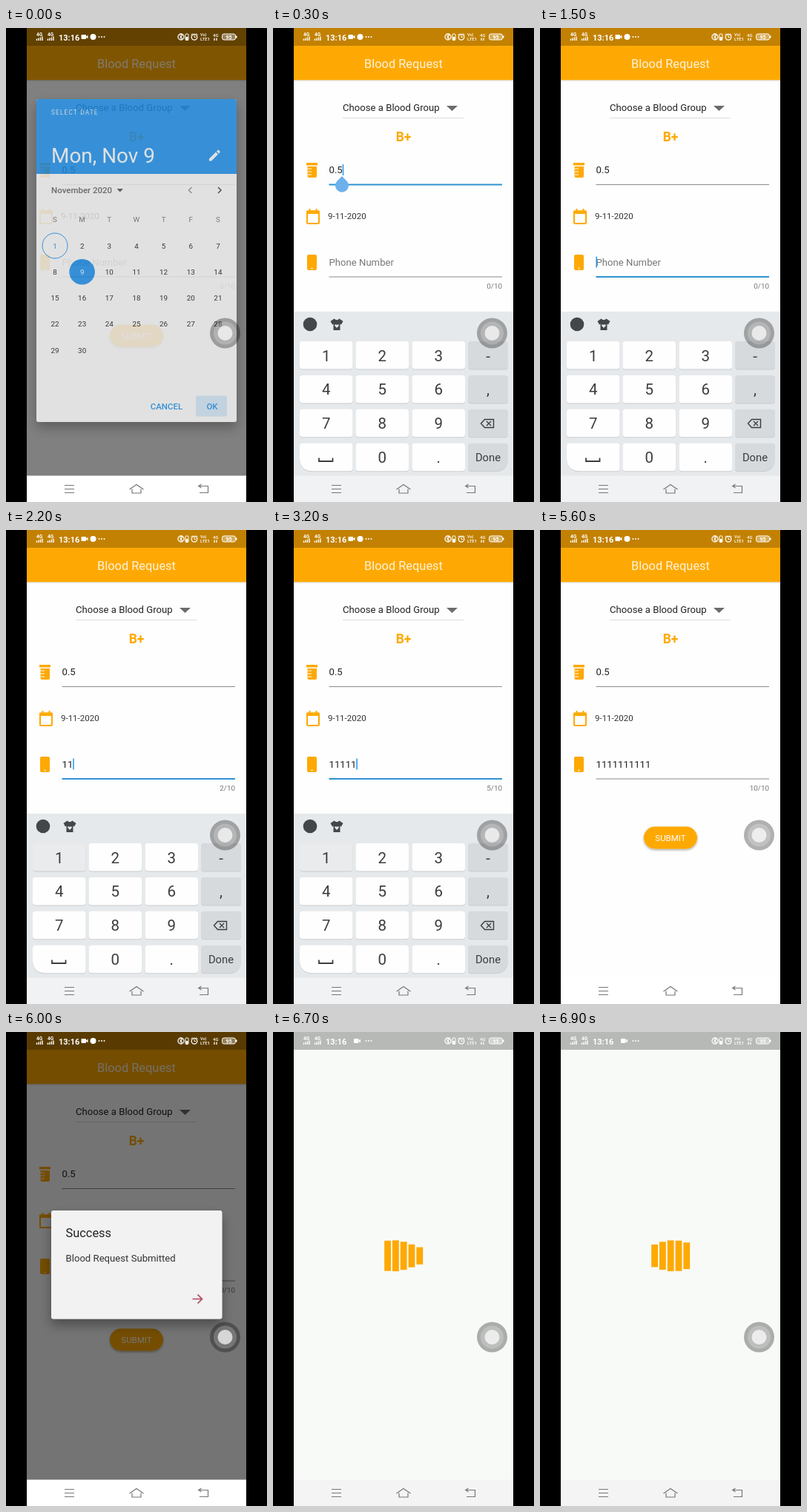
These frames come from a looping animation (352x640 px, 7 s). An HTML page:

```html
<!DOCTYPE html>
<html lang="en">
<head>
<meta charset="utf-8">
<title>Blood Request</title>
<style>
html, body { margin: 0; width: 100%; height: 100%; overflow: hidden; background: #000; }
svg { display: block; width: 352px; height: 640px; font-family: Roboto, sans-serif; }
text { white-space: pre; }
</style>
</head>
<body>
<svg id="stage" viewBox="0 0 352 640"></svg>
<script>
const LOOP = 7000, ORANGE = '#fea903', BLUE = '#2196f3';

// Markup helpers
const rect = (x, y, w, h, fill, more = '') =>
  `<rect x="${x}" y="${y}" width="${w}" height="${h}" fill="${fill}" ${more}/>`;
const circle = (x, y, r, fill, more = '') =>
  `<circle cx="${x}" cy="${y}" r="${r}" fill="${fill}" ${more}/>`;
const text = (x, y, size, fill, str, more = '') =>
  `<text x="${x}" y="${y}" font-size="${size}" fill="${fill}" ${more}>${str}</text>`;
const fillPath = (d, fill, more = '') => `<path d="${d}" fill="${fill}" ${more}/>`;
const line = (d, stroke, width = 1, more = '') =>
  `<path d="${d}" fill="none" stroke="${stroke}" stroke-width="${width}" ${more}/>`;
const group = (id, body, more = '') => `<g id="${id}" ${more}>${body}</g>`;
const MID = 'text-anchor="middle"', END = 'text-anchor="end"', MEDIUM = 'font-weight="500"';

function form() {
  const beaker = rect(45, 182, 15, 3.5, ORANGE) +
    fillPath('M46.5 187H59V200Q59 202 57 202H48.5Q46.5 202 46.5 200Z', ORANGE) +
    line('M46.5 190H52M46.5 194H52M46.5 198H52', '#fdfefd', 1.2);
  const calendar = rect(46, 247.5, 16, 16.5, 'none', `rx="1.5" stroke="${ORANGE}" stroke-width="2"`) +
    rect(45, 246.5, 18, 4.5, ORANGE, 'rx="1"') + line('M49.5 244V248M58.5 244V248', ORANGE, 2);
  const phone = rect(46, 306, 13, 21, ORANGE, 'rx="2"') + circle(52.5, 324.5, 1, '#fff');
  return rect(28, 0, 296, 640, '#fdfefd') +
    rect(28, 24, 296, 46.5, ORANGE) + rect(28, 70.5, 296, 1, '#d9d9d9') +
    rect(28, 0, 296, 24, '#c28102') +
    text(176, 53.5, 16.4, '#fff3da', 'Blood Request', MID) +
    text(94, 112, 13.15, '#222', 'Choose a Blood Group') +
    fillPath('M234 105H249L241.500 112Z', '#6b6b6b') +
    line('M94 121.500H257', '#dcdcdc') +
    text(176, 152.500, 17.500, ORANGE, 'B+', MID + ' font-weight="700"') +
    beaker + calendar + phone +
    text(75.500, 196, 13.15, '#222', '0.5') +
    line('M75.500 211.500H309', '#8b8b8b', 1, 'id="line1"') +
    group('handle', line('M94.500 184V199', BLUE, 1.500, 'id="caret1"') +
      fillPath('M93 200L99.400 206.400A9 9 0 1 1 86.600 206.400Z', '#6cb1ec')) +
    text(74, 258, 11.5, '#333', '9-11-2020') +
    text(75.5, 320.5, 13.15, '#777', 'Phone Number', 'id="hint"') +
    text(75.5, 320.5, 13.15, '#222', '', 'id="typed"') +
    line('M0 308.500V323.500', BLUE, 1.5, 'id="caret2"') +
    line('M75.500 336H309', '#8b8b8b', 1, 'id="line2"') +
    text(309, 352, 9.86, '#777', '0/10', 'id="count" ' + END) +
    rect(140, 400.5, 72, 30, ORANGE, 'rx="15" filter="url(#soft)"') +
    text(176, 419.5, 11.5, '#fff', 'SUBMIT', MID);
}

function keyboard() {
  const cols = [[36, 71.5], [111.5, 71.5], [187.5, 71.5], [263, 54]];
  const labels = ['1', '2', '3', '-', '4', '5', '6', ',', '7', '8', '9', '', '', '0', '.', 'Done'];
  let out = rect(28, 383, 296, 222, '#e6e9eb') + circle(50, 400, 9.3, '#43474a') +
    fillPath('M82.500 392.500Q86 396 89.500 392.500L94.500 396L92 400.500L90.500 399.500V408H81.500V399.500L80 400.500L77.500 396Z', '#43474a') +
    fillPath('M86 405L83 401.700Q83.300 399.200 86 400.700Q88.700 399.200 89 401.700Z', '#e6e9eb');
  labels.forEach((label, i) => {
    const col = i % 4, [x, w] = cols[col], y = 423 + 45.9 * (i >> 2), h = 37.5;
    const bl = i == 12 ? 18 : 4, br = i == 15 ? 18 : 4;
    const d = `M${x + 4} ${y}h${w - 8}q4 0 4 4v${h - 4 - br}q0 ${br} ${-br} ${br}h${bl + br - w}` +
      `q${-bl} 0 ${-bl} ${-bl}v${bl + 4 - h}q0 -4 4 -4z`;
    out += fillPath(d, '#c9ccd0', 'transform="translate(0 1)"') +
      fillPath(d, col == 3 ? '#d7dadd' : '#fefefe', `id="key${i}"`) +
      text(x + w / 2, y + (label == 'Done' ? 24.5 : 26.5), label == 'Done' ? 14.8 : 20.5, '#3a3d40', label, MID);
  });
  return out + line('M62 580.500V585H80.500V580.500', '#3a3d40', 1.8) +
    line('M280.500 534L285.500 528.500H297.500V539.500H285.500ZM288 531L294 537M294 531L288 537', '#3a3d40', 1.4);
}

function datePicker() {
  const colX = i => 66 + 36.65 * i;
  let out = rect(41, 96, 270, 436, '#fff', 'rx="3" filter="url(#drop)"') +
    fillPath('M41 197V99Q41 96 44 96H308Q311 96 311 99V197Z', BLUE) +
    text(61, 117, 8.2, '#e4f1fd', 'SELECT DATE', 'letter-spacing="1.23"') +
    text(61, 182, 27.95, '#fff', 'Mon, Nov 9') +
    fillPath('M274 179.500V176.500L283 167.500L286 170.500L277 179.500ZM284 166.500L285.500 165Q286.200 164.500 287 165L288.500 166.500Q289 167.200 288.500 168L287 169.500Z', '#fff') +
    text(61, 223, 11.5, '#666', 'November 2020', MEDIUM) +
    fillPath('M149.500 217H158L153.750 221.500Z', '#555') +
    line('M250.500 215L246.500 219L250.500 223', '#999', 1.5) +
    line('M286 215L290 219L286 223', '#444', 1.5) +
    circle(66, 294, 17, 'none', `stroke="${BLUE}"`) + circle(102.6, 329.3, 17.3, BLUE);
  [...'SMTWTFS'].forEach((c, i) => out += text(colX(i), 261.5, 9.86, '#777', c, MID));
  for (let d = 1; d <= 30; d++) {
    const fill = d == 9 ? '#fff' : d == 1 ? BLUE : '#222';
    out += text(colX((d - 1) % 7), 297.5 + 35.3 * Math.floor((d - 1) / 7), 9.86, fill, d, MID);
  }
  return out + text(216.5, 514.5, 11.5, BLUE, 'CANCEL', MID + MEDIUM.padStart(18)) +
    rect(256, 496.5, 42, 28, BLUE, 'opacity=".18" rx="2"') +
    text(278, 514.5, 11.5, BLUE, 'OK', MID + MEDIUM.padStart(18));
}

const success = () => rect(61, 241, 230.5, 146.5, '#f1f2f1', 'rx="3" filter="url(#drop)"') +
  text(80.5, 277, 16.4, '#222', 'Success') +
  text(80.5, 310, 13.15, '#333', 'Blood Request Submitted') +
  circle(258, 360.5, 16, '#b5475f', 'id="tap" opacity="0"') +
  line('M251.500 360.500H264M258.500 354.500L264.500 360.500L258.500 366.500', '#b5475f', 1.7);

function loader() {
  let bars = '';
  for (let i = 0; i < 5; i++) bars += rect(150.2 + 10.8 * i, 281, 8.8, 42, ORANGE, 'class="bar"');
  return rect(28, 0, 296, 640, '#f8faf8') + rect(28, 0, 296, 24, '#b7b9b7') + bars;
}

function statusBar() {
  const signal = x => text(x, 10.5, 6.5, '#fff', '4G', MID + ' font-weight="700"') +
    line(`M${x - 3.500} 17V14.500M${x - 1} 17V13.500M${x + 1.500} 17V12.500M${x + 4} 17V11.500`, '#fff', 1.4);
  return signal(45) + signal(60) +
    text(71, 16.5, 11, '#fff', '13:16', 'font-weight="700"') +
    group('video', rect(101.5, 9, 6.5, 6, '#fff', 'rx="1"') + fillPath('M108 11.500L110.500 9.500V14.500L108 12.500Z', '#fff')) +
    circle(117.5, 12, 4, '#fff', 'id="app"') +
    [125.5, 129, 132.5].map(x => circle(x, 12, 1, '#fff')).join('') +
    circle(236, 12, 4, 'none', 'stroke="#fff" stroke-width="1.300"') +
    line('M234 10L238 14L236 15.500V8.500L238 10L234 14', '#fff', .9) +
    rect(242, 8, 4, 8.5, 'none', 'stroke="#fff" rx="1"') + rect(242.5, 12, 3, 4, '#fff') +
    circle(254, 12.3, 3.8, 'none', 'stroke="#fff" stroke-width="1.300"') +
    line('M254 10V12.500H256M249.500 9.500L251.500 7.500M256.500 7.500L258.500 9.500', '#fff') +
    text(262, 10.5, 5.5, '#fff', 'Vo)', MEDIUM) + text(262, 17, 6, '#fff', 'LTE1', MEDIUM) +
    text(279, 11.5, 6, '#fff', '4G', MEDIUM) + line('M281 17V13.500M284 17V13.500', '#fff', 1.3) +
    rect(291.5, 8, 18, 8, '#fff', 'rx="2.500" opacity=".35"') +
    rect(291.5, 8, 18, 8, 'none', 'rx="2.500" stroke="#fff"') + rect(310, 10.5, 1.5, 3, '#fff') +
    text(300.5, 14.7, 7, '#fff', '95', MID + ' font-weight="700"');
}

const navBar = () => rect(28, 604.5, 296, 35.5, '#fff', 'id="navBack"') +
  line('M79 617.500H92M79 622.500H92M79 627.500H92', '#777', 1.2) +
  line('M166.500 623L176 616.500L185.500 623M170 622.500V628H182V622.500', '#777', 1.2) +
  line('M263.500 616L260 618.500H272.500V627.500H261M260 618.500L263.500 621', '#777', 1.2);

const touchDot = () => circle(295.5, 412, 20.5, '#000', 'opacity=".310"') +
  circle(295.5, 412, 15.5, '#fff', 'opacity=".220"') + circle(295.5, 412, 10, '#fff', 'opacity=".700"');

const shadow = (id, dy, blur, alpha) =>
  `<filter id="${id}" x="-20%" y="-20%" width="140%" height="150%"><feDropShadow dx="0" dy="${dy}" stdDeviation="${blur}" flood-opacity="${alpha}"/></filter>`;

document.getElementById('stage').innerHTML =
  `<defs>${shadow('soft', 1.5, 1.5, .35)}${shadow('drop', 8, 8, .35)}<clipPath id="screen">${rect(28, 0, 296, 640, '#000')}</clipPath></defs>` +
  rect(0, 0, 352, 640, '#000') +
  group('phone', form() + group('keys', keyboard()) +
    rect(28, 0, 296, 605, '#000', 'id="scrim"') +
    group('picker', datePicker()) + group('success', success()) +
    group('loader', loader()) + statusBar() + navBar() + touchDot(),
  'clip-path="url(#screen)"');

const el = id => document.getElementById(id);
const set = (id, attrs) => { for (const k in attrs) el(id).setAttribute(k, attrs[k]); };
const show = (id, on) => set(id, { opacity: +on });
const ramp = (t, a, b) => Math.min(1, Math.max(0, (t - a) / (b - a)));
const easeOut = u => 1 - (1 - u) ** 3;
const within = (t, spans) => spans.some(([a, b]) => t >= a && t < b);
const bars = document.querySelectorAll('.bar');

const digitTimes = [1950, 2200, 2450, 2750, 3050, 3280, 3500, 3760, 3980, 4150];
const presses = [[1880, 1990], [2150, 2240], [2980, 3060], [3160, 3270], [3480, 3560], [3970, 4050], [4120, 4180]];

function draw(t) {
  // Form fields
  const first = t >= 150 && t < 950, second = t >= 950 && t < 5050;
  const underline = on => ({ stroke: on ? '#2f92d2' : '#8b8b8b', 'stroke-width': on ? 2 : 1 });
  const n = digitTimes.filter(d => t >= d).length;
  set('line1', underline(first));
  set('line2', underline(second));
  show('handle', first);
  show('caret1', t < 650);
  show('hint', n == 0);
  el('typed').textContent = '1'.repeat(n);
  el('count').textContent = n + '/10';
  set('caret2', { transform: `translate(${76.2 + 7.39 * n} 0)` });
  show('caret2', second && !within(t, [[1550, 1950], [4450, 4850]]));

  // Keyboard
  const up = easeOut(ramp(t, 100, 290)) * (1 - ramp(t, 5000, 5200) ** 2);
  set('keys', { transform: `translate(0 ${222 * (1 - up)})` });
  set('key0', { fill: within(t, presses) ? '#e9ebed' : '#fefefe' });
  set('key15', { fill: within(t, [[4920, 5020]]) ? '#c6cacd' : '#d7dadd' });

  // Dialogs and their scrim
  const picker = .77 * (1 - ramp(t, 0, 140));
  const alert = ramp(t, 5680, 5840) * (1 - ramp(t, 6180, 6330));
  show('picker', picker);
  show('success', alert);
  set('scrim', { opacity: Math.max(picker * .65, alert * .54) });
  set('tap', { opacity: within(t, [[6080, 6250]]) ? .15 : 0 });

  // Loading page
  const open = ramp(t, 6330, 6600);
  show('loader', easeOut(open));
  set('loader', { transform: `translate(0 ${150 * (1 - easeOut(open))})` });
  bars.forEach((bar, i) => {
    const h = 42 * (.7 + .3 * Math.sin(2 * Math.PI * ((t - 6900) / 1200 + .485 - .1 * i)));
    bar.setAttribute('y', 302.2 - h / 2);
    bar.setAttribute('height', h);
  });

  // System bars
  const loading = t >= 6450;
  set('navBack', { fill: loading ? '#f3f4f3' : up > .5 ? '#f1f2f3' : '#fff' });
  set('video', { transform: `translate(${loading ? 7.5 : 0} 0)` });
  show('app', !loading);
}

const start = performance.now();
function tick() {
  draw((performance.now() - start) % LOOP);
  requestAnimationFrame(tick);
}
tick();
</script>
</body>
</html>
```
